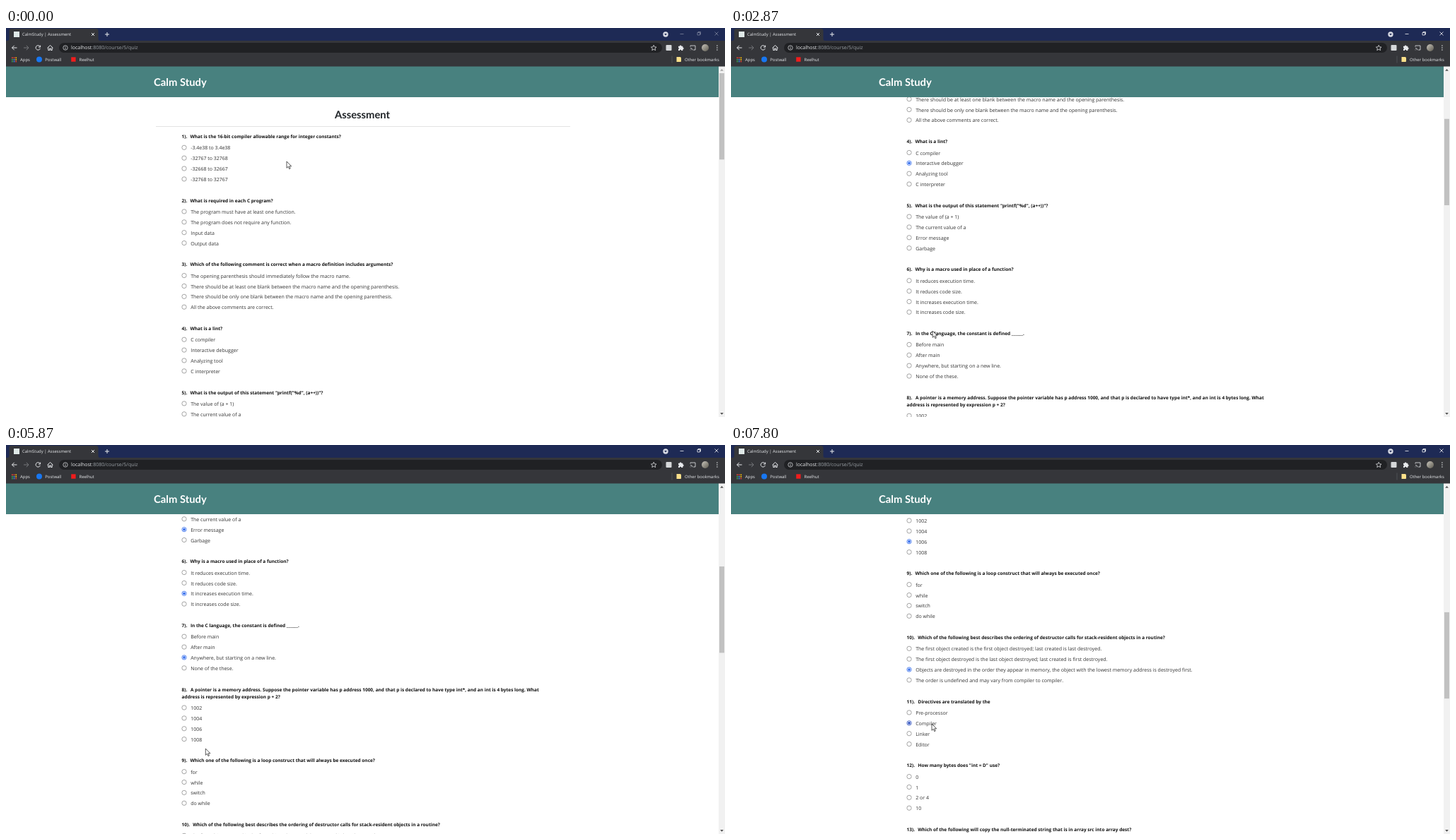
Recreate the animation shown at these times as an HTML page. Size 1017 by 551 pixels, loop 8000 ms.

```html
<!DOCTYPE html>
<html lang="en">
<head>
<meta charset="utf-8">
<title>Assessment</title>
<style>
  html, body { margin: 0; width: 100%; height: 100%; overflow: hidden; background: #fff; }
  svg { display: block; width: 1017px; height: 551px; }
  text { font-family: "Open Sans", "Noto Sans", sans-serif; text-rendering: geometricPrecision; white-space: pre; }
  .heading { font: 700 14.8px Lato, sans-serif; }
  .question { font-size: 6.5px; font-weight: 700; fill: #111; }
  .option { font-size: 7px; fill: #333; }
  .ui { font-size: 5.95px; fill: #e8eaed; }
  .url { font-size: 7px; fill: #9aa0a6; }
  .line { fill: none; stroke: #e8eaed; stroke-width: 1; }
  .ring { fill: #fff; stroke: #767676; stroke-width: .65; }
  .dot { fill: none; }
  .on .ring { stroke: #3a72ee; stroke-width: .85; }
  .on .dot { fill: #3a72ee; }
  .on.hover .ring { stroke: #3052c0; }
  .on.hover .dot { fill: #3052c0; }
  #controls { fill: none; stroke: #8288a0; stroke-width: .75; }
  #controls.active { stroke: #fff; }
  #up { fill: #a3a3a3; }
  #up.active { fill: #505050; }
</style>
</head>
<body>
<svg viewBox="0 0 1017 551">
  <defs>
    <linearGradient id="avatar" x2="1" y2="1">
      <stop stop-color="#c9c6bd"/><stop offset="1" stop-color="#5d5a50"/>
    </linearGradient>
  </defs>
  <rect width="1017" height="551" fill="#fff"/>

  <g id="page">
    <text class="heading" x="504" y="128" text-anchor="middle" fill="#212529">Assessment</text>
    <rect x="212" y="139" width="586" height=".8" fill="#dcdcdc"/>
  </g>

  <rect y="54" width="1008" height="44" fill="#48817f"/>
  <text class="heading" x="209" y="82" fill="#fff">Calm Study</text>

  <!-- scrollbar -->
  <rect x="1008" y="54" width="9" height="497" fill="#f1f1f1"/>
  <path id="up" d="M1010.2 60.8h4.6l-2.3-2.8z"/>
  <path d="M1010.2 545h4.6l-2.3 2.8z" fill="#505050"/>
  <rect id="thumb" x="1009" y="64" width="7" height="122.3" fill="#c1c1c1"/>

  <!-- tab strip -->
  <rect width="1017" height="18" fill="#1e2a55"/>
  <path d="M2 18q2.500 0 2.500-3V4q0-3 3-3h120q3 0 3 3v11q0 3 2.500 3z" fill="#35363a"/>
  <rect x="11" y="5" width="8" height="8" fill="#dfe9e8"/>
  <text class="ui" x="23" y="11.200">CalmStudy | Assessment</text>
  <path class="line" d="M121 7l4 4m0-4l-4 4M140 9h6m-3-3v6"/>
  <circle cx="933" cy="9" r="3.700" fill="#d5d8e2"/>
  <path d="M931.200 8h3.600l-1.800 2.400z" fill="#1e2a55"/>
  <path id="controls" d="M953.500 8.500h5M978 6.500h3.500v3.500h-3.500zM979 6.500v-1h3.500v3.500h-1M1002.500 5.500l5 5m0-5l-5 5"/>

  <!-- toolbar -->
  <rect y="18" width="1017" height="36.500" fill="#35363a"/>
  <rect x="75" y="21" width="853" height="14" rx="7" fill="#202124"/>
  <path class="line" d="M15.500 28H8.500m3.200-3.200L8.500 28l3.200 3.200"/>
  <path class="line" d="M25 28h7m-3.200-3.200L32 28l-3.200 3.200" style="stroke:#75777b"/>
  <path class="line" d="M48 26.200a3.200 3.200 0 1 0 .3 2.800M48.600 24.600v2.500h-2.500"/>
  <path class="line" d="M58.500 28.300l4-3.800 4 3.800M59.800 27.500v4h1.900v-2.500h1.600v2.500h1.900v-4"/>
  <circle class="line" cx="84" cy="28" r="3.200" style="stroke-width:.7"/>
  <path class="line" d="M84 27.500v2.300m0-3.900v.8" style="stroke-width:.8"/>
  <text class="url" x="92" y="30.300"><tspan fill="#e8eaed">localhost</tspan>:8080/course/5/quiz</text>
  <path class="line" d="M916.200 24.300l1.100 2.500 2.700.3-2 1.800.6 2.700-2.400-1.400-2.400 1.400.6-2.700-2-1.800 2.700-.3z" style="stroke-width:.75"/>
  <rect x="933.500" y="24" width="8" height="8" rx="1" fill="#d6d8da"/>
  <path d="M951 25.800h1.800a1.300 1.300 0 0 1 2.600 0h1.900v1.800a1.300 1.300 0 0 1 0 2.600v1.800h-2a1.200 1.200 0 0 0-2.400 0H951v-2a1.200 1.200 0 0 0 0-2.300z" fill="#e8eaed"/>
  <path class="line" d="M968 26.500v-1.500h7v6h-3M968 28.500a2.800 2.800 0 0 1 2.800 2.800M968 30.500v.8" style="stroke-width:.8"/>
  <circle cx="989" cy="28" r="5" fill="url(#avatar)"/>
  <path d="M1005.900 25h.01m-.01 3h.01m-.01 3h.01" stroke="#e8eaed" stroke-width="1.500" stroke-linecap="round"/>

  <!-- bookmarks -->
  <g id="apps"></g>
  <text class="ui" x="20" y="46.500">Apps</text>
  <circle cx="47" cy="44.500" r="4" fill="#1877f2"/>
  <text class="ui" x="55.300" y="46.500">Postwall</text>
  <rect x="92.200" y="41.300" width="6.400" height="6.400" fill="#f01d1d"/>
  <text class="ui" x="103.500" y="46.500">Reelhut</text>
  <rect x="941.700" y="39.500" width=".6" height="10" fill="#5f6368"/>
  <path d="M948.500 41h5q1.500 0 1.500 1.500v4.500q0 1-1 1h-5.500z" fill="#fbe08a"/>
  <text class="ui" x="960" y="46.500">Other bookmarks</text>

  <path id="cursor" d="M0 0v9.300l2.200-2 1.500 3.400 1.500-.7-1.500-3.200h3z" fill="#fff" stroke="#222" stroke-width=".75"/>
</svg>
<script>
const DURATION = 8000, STEP = 200 / 3;
const QUESTIONS = [
  ['What is the 16-bit compiler allowable range for integer constants?',
    '-3.4e38 to 3.4e38', '-32767 to 32768', '-32668 to 32667', '-32768 to 32767'],
  ['What is required in each C program?',
    'The program must have at least one function.', 'The program does not require any function.', 'Input data', 'Output data'],
  ['Which of the following comment is correct when a macro definition includes arguments?',
    'The opening parenthesis should immediately follow the macro name.',
    'There should be at least one blank between the macro name and the opening parenthesis.',
    'There should be only one blank between the macro name and the opening parenthesis.',
    'All the above comments are correct.'],
  ['What is a lint?', 'C compiler', 'Interactive debugger', 'Analyzing tool', 'C interpreter'],
  ['What is the output of this statement "printf("%d", (a++))"?',
    'The value of (a + 1)', 'The current value of a', 'Error message', 'Garbage'],
  ['Why is a macro used in place of a function?',
    'It reduces execution time.', 'It reduces code size.', 'It increases execution time.', 'It increases code size.'],
  ['In the C language, the constant is defined ______.',
    'Before main', 'After main', 'Anywhere, but starting on a new line.', 'None of the these.'],
  ['A pointer is a memory address. Suppose the pointer variable has p address 1000, and that p is declared to have type int*, and an int is 4 bytes long. What\naddress is represented by expression p + 2?',
    '1002', '1004', '1006', '1008'],
  ['Which one of the following is a loop construct that will always be executed once?',
    'for', 'while', 'switch', 'do while'],
  ['Which of the following best describes the ordering of destructor calls for stack-resident objects in a routine?',
    'The first object created is the first object destroyed; last created is last destroyed.',
    'The first object destroyed is the last object destroyed; last created is first destroyed.',
    'Objects are destroyed in the order they appear in memory, the object with the lowest memory address is destroyed first.',
    'The order is undefined and may vary from compiler to compiler.'],
  ['Directives are translated by the', 'Pre-processor', 'Compiler', 'Linker', 'Editor'],
  ['How many bytes does "int = D" use?', '0', '1', '2 or 4', '10'],
  ['Which of the following will copy the null-terminated string that is in array src into array dest?']
];
// time, question, option, end of hover
const CHECKS = [
  [470, 1, 4, 670], [930, 2, 2, 1130], [1530, 3, 1, 1670], [2270, 4, 2, 2870], [3330, 5, 3, 3470],
  [3870, 6, 3, 4330], [4670, 7, 3, 4800], [6270, 8, 3, 6730], [7070, 10, 3, 7330], [7800, 11, 2, 8100]
];
// time, x, y
const POINTER = [
  [0, 397, 189], [330, 295, 219.5], [600, 295, 219.5], [900, 288, 276], [1030, 288, 276],
  [1400, 290.5, 346], [1470, 290, 351], [1600, 290, 352], [1800, 288, 414], [1970, 288, 414],
  [2270, 284, 452], [2800, 284, 452], [3270, 292, 298], [3370, 292, 298], [3730, 293, 387],
  [4290, 293, 387], [4600, 291, 304], [4690, 291, 304], [4870, 293.5, 378], [5400, 284, 434],
  [5820, 284, 434], [6200, 271, 403.5], [6670, 271, 403.5], [6930, 287, 320], [7220, 287, 320], [7750, 284, 395]
];
// time, distance
const SCROLL = [
  [2480, 0], [2530, 26.5], [2600, 95], [2670, 185], [2730, 245], [2800, 264.8],
  [4030, 264.8], [4130, 360], [4200, 420], [4270, 442],
  [6290, 442], [6330, 452], [6400, 491.7], [6470, 620], [6530, 707]
];

const $ = id => document.getElementById(id);
const page = $('page'), radios = {};

function add(parent, tag, attrs, text) {
  const el = document.createElementNS('http://www.w3.org/2000/svg', tag);
  for (const k in attrs) el.setAttribute(k, attrs[k]);
  if (text) el.textContent = text;
  return parent.appendChild(el);
}

function addQuestion([title, ...options], i) {
  let y = 153.6 + 90.65 * i + (i > 7 ? 10.15 : 0);
  const [first, second] = title.split('\n');
  const line = add(page, 'text', { class: 'question', x: 248.6, y: y + 2.4 }, `${i + 1}).`);
  add(line, 'tspan', { dx: 4.5 }, first);
  if (second) {
    y += 10.15;
    add(page, 'text', { class: 'question', x: 248.6, y: y + 2.4 }, second);
  }
  options.forEach((label, j) => {
    const cy = y + 16.3 + 14.87 * j;
    const g = radios[`${i + 1}-${j + 1}`] = add(page, 'g', {});
    add(g, 'circle', { class: 'ring', cx: 252, cy: cy - .6, r: 3.15 });
    add(g, 'circle', { class: 'dot', cx: 252, cy: cy - .6, r: 1.9 });
    add(page, 'text', { class: 'option', x: 261.2, y: cy + 2.5 }, label);
  });
}

function at(keys, t) {
  const n = keys.findIndex(k => k[0] > t);
  if (n === 0) return keys[0].slice(1);
  if (n < 0) return keys[keys.length - 1].slice(1);
  const a = keys[n - 1], b = keys[n], p = (t - a[0]) / (b[0] - a[0]);
  return a.slice(1).map((v, i) => v + (b[i + 1] - v) * p);
}

function draw() {
  const now = (performance.now() - start) % DURATION;
  const t = Math.round(Math.floor((now + 4) / STEP) * STEP / 10) * 10;
  const [scroll] = at(SCROLL, t), [x, y] = at(POINTER, t);
  page.setAttribute('transform', `translate(0 ${-scroll})`);
  $('thumb').setAttribute('y', 64 + scroll * .2445);
  $('up').classList.toggle('active', scroll > 0);
  $('cursor').setAttribute('transform', `translate(${x} ${y})`);
  $('controls').classList.toggle('active', t >= 470);
  for (const [time, q, o, end] of CHECKS) {
    const { classList } = radios[`${q}-${o}`];
    classList.toggle('on', t >= time);
    classList.toggle('hover', t >= time && t < end);
  }
  requestAnimationFrame(draw);
}

QUESTIONS.forEach(addQuestion);
['#ea4335', '#ea4335', '#fbbc04', '#34a853', '#4285f4', '#fbbc04', '#34a853', '#4285f4', '#ea4335'].forEach((fill, i) =>
  add($('apps'), 'rect', { x: 8 + i % 3 * 2.7, y: 41.4 + Math.floor(i / 3) * 2.6, width: 1.7, height: 1.7, fill }));
const start = performance.now();
draw();
</script>
</body>
</html>
```
